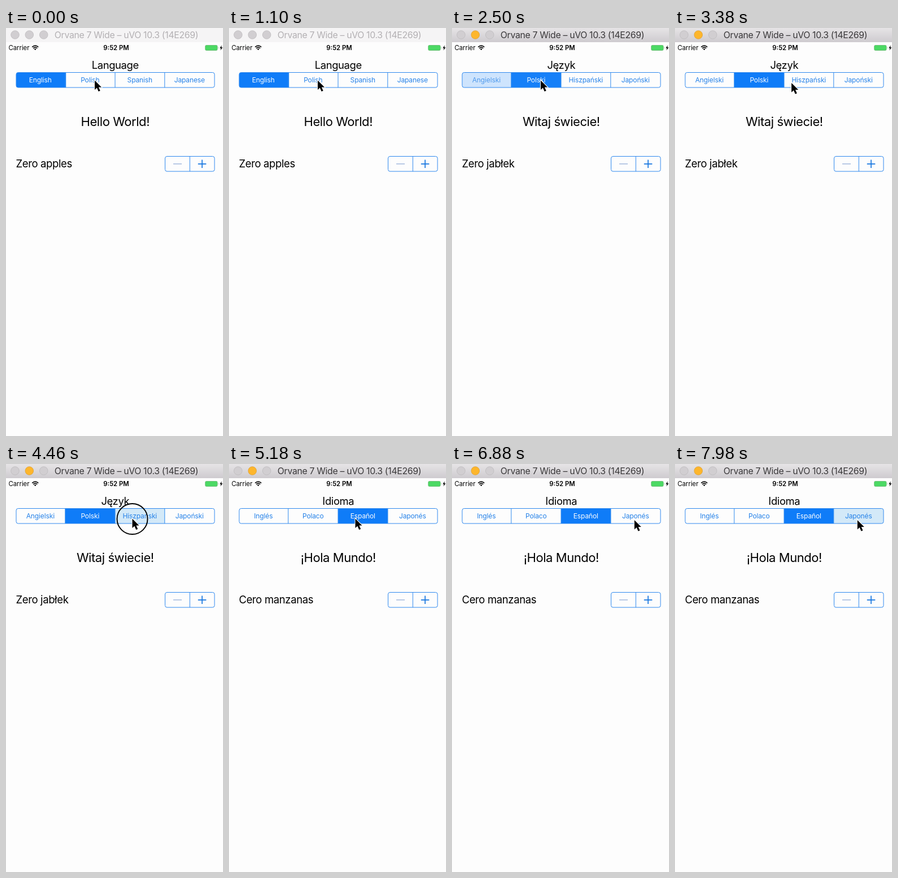
An HTML page that plays this animation: 384 px wide and 720 px high, repeating every 8 s.

```html
<!DOCTYPE html>
<html lang="en">
<head>
<meta charset="utf-8">
<title>Language switcher</title>
<style>
  html, body { margin: 0; width: 100%; height: 100%; overflow: hidden; background: #fdfdfd; }
  svg { display: block; width: 100vw; height: 100vh; }
  text { font-family: Inter, Roboto, sans-serif; letter-spacing: -.02em; }
  .mid { text-anchor: middle; }
  .label { font-size: 12px; letter-spacing: -.01em; }
  .status { font-size: 11.3px; letter-spacing: 0; }
  .line { fill: none; stroke: #3089ee; stroke-width: 1; }
</style>
</head>
<body>
<svg viewBox="0 0 384 720">
  <defs>
    <linearGradient id="activeBar" x2="0" y2="1">
      <stop stop-color="#e6e4e6"/><stop offset="1" stop-color="#cecbcf"/>
    </linearGradient>
    <clipPath id="control"><rect x="18" y="78.5" width="351" height="26.5" rx="3.5"/></clipPath>
  </defs>
  <rect width="384" height="720" fill="#fdfdfd"/>

  <rect id="bar" width="384" height="25"/>
  <g stroke="#bdbabd" stroke-width=".8" fill="#d1ced1">
    <circle cx="16" cy="12" r="7.3"/>
    <circle id="minimize" cx="41.3" cy="12" r="7.3"/>
    <circle cx="66.7" cy="12" r="7.3"/>
  </g>
  <text id="windowTitle" class="mid" x="213" y="17.6" font-size="15.8">Orvane 7 Wide – uVO 10.3 (14E269)</text>

  <text class="status" x="4.5" y="39">Carrier</text>
  <g fill="none" stroke="#000" stroke-width="1.6">
    <path d="M46.2 33.6Q51.7 28.6 57.2 33.6M48.2 35.8Q51.7 32.6 55.2 35.8"/>
    <path d="M49.8 37L51.7 39.2L53.6 37Q51.7 35.6 49.8 37Z" fill="#000" stroke="none"/>
  </g>
  <text class="status mid" x="195" y="39" font-weight="600">9:52 PM</text>
  <rect x="352.7" y="30.5" width="21.3" height="9" rx="1.8" fill="#4cd964" stroke="#62b56c" stroke-width=".8"/>
  <path d="M375 33.4q1.5 1.6 0 3.2z" fill="#62b56c"/>
  <path d="M381.8 30.5l-3.6 5h2.2l-1 4 4-5.2h-2.3z"/>

  <text id="heading" class="mid" x="193.3" y="71.5" font-size="18.4"></text>
  <g id="segments" clip-path="url(#control)"></g>
  <path class="line" d="M104.8 78.5v26.5M193 78.5v26.5M280.8 78.5v26.5"/>
  <rect class="line" x="18" y="78.5" width="351" height="26.5" rx="3.5"/>
  <g id="labels"></g>

  <text id="greeting" class="mid" x="193.3" y="173" font-size="22"></text>
  <text id="apples" x="17.5" y="246.3" font-size="18.5"></text>
  <rect class="line" x="281.5" y="226.5" width="87.5" height="26.5" rx="3.5"/>
  <path class="line" d="M325.3 226.5v26.5"/>
  <path d="M296 239.8h15" stroke="#a3b9de" stroke-width="1.5"/>
  <path d="M339.8 239.8h14.5M347 232.5v14.5" stroke="#1676e0" stroke-width="1.7"/>

  <g id="pointer">
    <circle id="ring" cy=".5" r="27" fill="none" stroke="#000" stroke-width="1.9"/>
    <path d="M0 0V16.6L3.8 13.1L6.7 19.6L9.7 18.3L6.9 12H12Z" stroke="#fff" stroke-width="2" paint-order="stroke"/>
  </g>
</svg>
<script>
const $ = id => document.getElementById(id);
const LOOP = 8000, FADE = 225, ACTIVATED = 1400;
const BLUE = [38, 130, 232], WHITE = [255, 255, 255];

const languages = [
  { heading: 'Language', greeting: 'Hello World!', apples: 'Zero apples',
    names: ['English', 'Polish', 'Spanish', 'Japanese'] },
  { heading: 'Język', greeting: 'Witaj świecie!', apples: 'Zero jabłek',
    names: ['Angielski', 'Polski', 'Hiszpański', 'Japoński'] },
  { heading: 'Idioma', greeting: '¡Hola Mundo!', apples: 'Cero manzanas',
    names: ['Inglés', 'Polaco', 'Español', 'Japonés'] }
];
// Each press highlights a segment; the choice lands just after release.
const presses = [
  { segment: 1, down: 1400, up: 2280, chosen: 2320 },
  { segment: 2, down: 4180, up: 4850, chosen: 4900 },
  { segment: 3, down: 7100, up: 7900, chosen: LOOP }
];
// Two-part moves: accelerate to the midpoint, then settle.
const moves = [
  { start: 3000, mid: 3380, end: 3700, points: [[157, 92.5], [206, 97], [223.5, 96.5]] },
  { start: 5500, mid: 5860, end: 6250, points: [[223.5, 96.5], [292.8, 104], [322.8, 99]] }
];

function add(parent, tag, attributes) {
  const node = document.createElementNS('http://www.w3.org/2000/svg', tag);
  for (const key in attributes) node.setAttribute(key, attributes[key]);
  return parent.appendChild(node);
}
const segments = [18, 104.8, 193, 280.8].map((x, i) => {
  const box = { x, y: 78, width: 88.2, height: 28 };
  return {
    tint: add($('segments'), 'rect', { ...box, fill: '#d3e9f8' }),
    fill: add($('segments'), 'rect', { ...box, fill: '#0f7cf8' }),
    label: add($('labels'), 'text', { x: 60.8 + 88 * i, y: 96, class: 'mid label' })
  };
});

const clamp = v => Math.max(0, Math.min(1, v));
const mix = (a, b, p) => a.map((v, i) => v + (b[i] - v) * p);

function pointerAt(t) {
  const move = t < moves[1].start ? moves[0] : moves[1];
  const [from, via, to] = move.points;
  if (t < move.mid) {
    const p = clamp((t - move.start) / (move.mid - move.start));
    return mix(from, via, p * p);
  }
  const q = 1 - clamp((t - move.mid) / (move.end - move.mid));
  return mix(via, to, 1 - q * q);
}

function draw(t) {
  const active = t >= ACTIVATED;
  $('bar').setAttribute('fill', active ? 'url(#activeBar)' : '#f5f4f5');
  $('minimize').setAttribute('fill', active ? '#fdb62c' : '#d1ced1');
  $('minimize').setAttribute('stroke', active ? '#dea034' : '#bdbabd');
  $('windowTitle').setAttribute('fill', active ? '#3a383a' : '#b3b0b3');

  const current = presses.filter(p => t >= p.chosen).length;
  const language = languages[current];
  for (const id of ['heading', 'greeting', 'apples']) $(id).textContent = language[id];

  // The old choice fades out evenly while the new one fills in faster.
  const remaining = current ? 1 - clamp((t - presses[current - 1].chosen) / FADE) : 0;
  const press = presses.find(p => t >= p.down && t < p.chosen);
  segments.forEach(({ tint, fill, label }, i) => {
    const level = i === current ? 1 - remaining ** 2 : i === current - 1 ? remaining : 0;
    const tinted = press ? press.segment === i : i === current && remaining > 0;
    tint.setAttribute('opacity', tinted ? 1 : 0);
    fill.setAttribute('opacity', level);
    label.setAttribute('fill', `rgb(${mix(BLUE, WHITE, level)})`);
    label.textContent = language.names[i];
  });

  $('pointer').setAttribute('transform', `translate(${pointerAt(t)})`);
  $('ring').setAttribute('opacity', press && t < press.up ? 1 : 0);
}

const begin = performance.now();
function tick() {
  draw((performance.now() - begin) % LOOP);
  requestAnimationFrame(tick);
}
tick();
</script>
</body>
</html>
```
